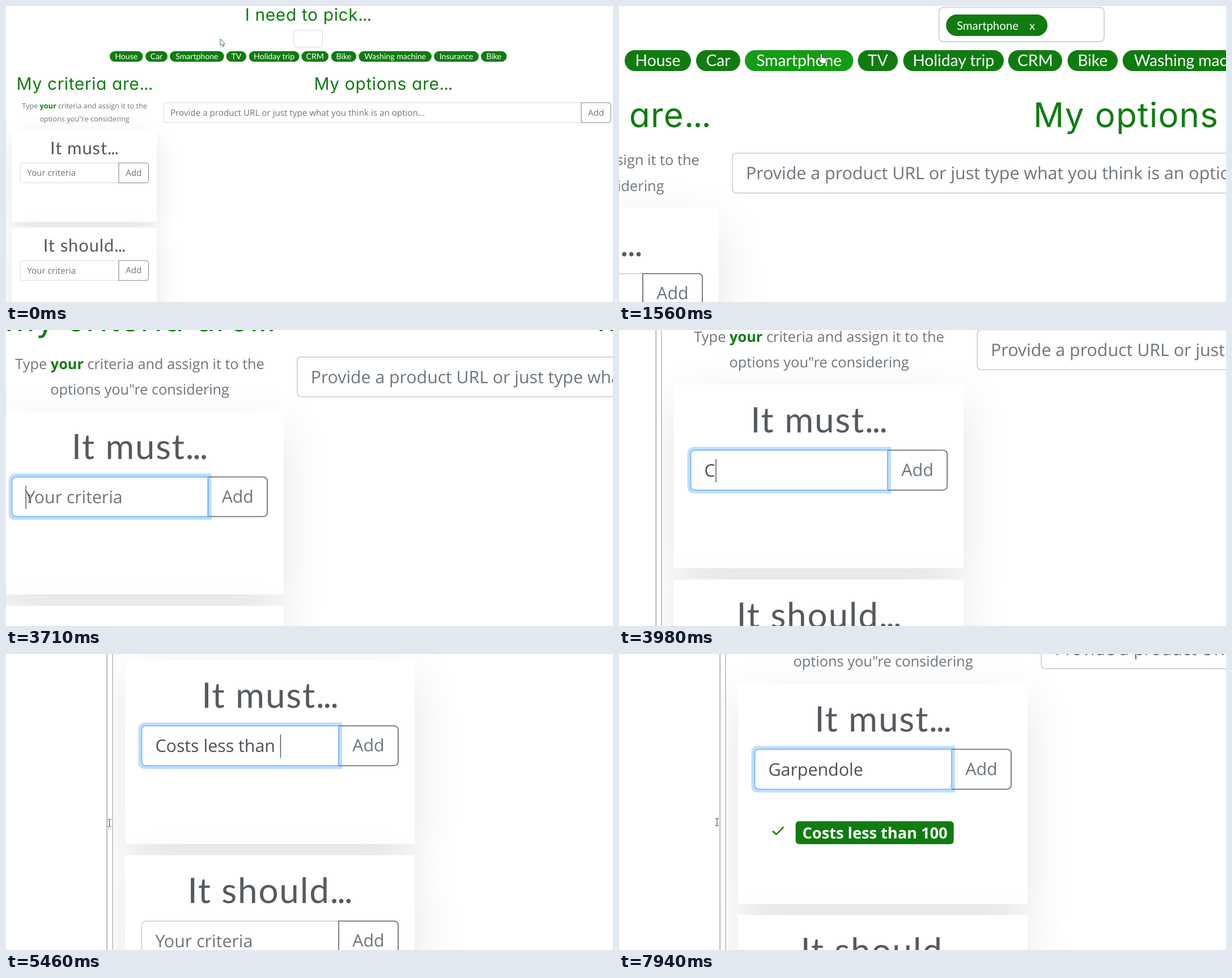
These frames come from a looping animation (1071x523 px, 7.99 s). An HTML page:

```html
<!DOCTYPE html>
<html lang="en">
<head>
<meta charset="utf-8">
<title>Decision helper</title>
<style>
  html, body { margin: 0; width: 100%; height: 100%; overflow: hidden; background: #fff; }
  svg { display: block; width: 1071px; height: 523px; }
  text { font-family: "Open Sans", sans-serif; font-size: 15.2px; fill: #6c757d; white-space: pre; text-rendering: geometricPrecision; }
  .mid { text-anchor: middle; }
  .head { font-family: Inter, sans-serif; font-size: 30px; letter-spacing: .6px; font-feature-settings: "cv11"; fill: #107c10; }
  .title { font-family: Lato, sans-serif; font-size: 31px; letter-spacing: .9px; fill: #555a5f; }
  .dots { letter-spacing: -1px; }
  .pill { font-family: Lato, sans-serif; font-size: 14.1px; fill: #fff; }
  .tag { font-family: Lato, sans-serif; font-size: 10.2px; fill: #fff; }
  .hint { font-size: 12.7px; }
  .hint tspan { font-weight: 700; fill: #107c10; }
  .badge { font-size: 13.6px; font-weight: 700; fill: #fff; }
  .typed { fill: #495057; }
  .shadow { fill: #000; opacity: .1; filter: blur(22px); }
</style>
</head>
<body>
<svg id="stage" viewBox="0 0 1071 523"></svg>
<script>
const LOOP = 7990;
const GREEN = '#107c10';
const T = { hover: 620, tag: 1560, leave: 1930, focus: 3030, tab: 5950, enter: 6150, refocus: 6700 };
const ENTRIES = [
  { text: 'Costs less than 100', start: 3900, step: 100, clear: T.enter },
  { text: 'Garpendole', start: 6800, step: 65, clear: LOOP }
];

// time, scale, x, y
const CAMERA = [
  [0, 1, 0, 0], [740, 1, 0, 0], [1090, 2, -356, -83.5], [1820, 2, -356, -83.5], [2210, 1, 0, 0],
  [3390, 1, 0, 0], [3760, 2, -40, -297], [4200, 2, 189, -389.6], [4340, 2, 189, -390],
  [5080, 2, 189, -390], [5620, 2, 189, -434], [7480, 2, 189, -434], [7945, 2, 189, -388]
];
// time, x, y on the stage
const POINTER = [
  [0, 378, 58], [50, 378, 58], [720, 357, 84], [1850, 357, 84], [2580, 85, 302], [2720, 85, 302],
  [3000, 41, 298], [5050, 41, 298], [5051, 190, 292], [5600, 182, 299], [6640, 182, 299],
  [7400, 176, 298], [7940, 173, 297]
];
// start time, shape
const SHAPES = [[0, 'arrow'], [T.hover, 'hand'], [T.leave, 'arrow'], [2480, 'beam'], [3900, ''], [5060, 'beam']];

const PILLS = [
  ['House', 183, 241.5], ['Car', 246, 285], ['Smartphone', 289, 384.7], ['TV', 388.7, 424],
  ['Holiday trip', 428.7, 517.5], ['CRM', 521.3, 569], ['Bike', 573.7, 618],
  ['Washing machine', 622.3, 751], ['Insurance', 755, 834], ['Bike', 838, 883.5]
];

const stage = document.getElementById('stage');

function add(parent, tag, attrs = {}, content = '') {
  const el = document.createElementNS('http://www.w3.org/2000/svg', tag);
  for (const key in attrs) el.setAttribute(key, attrs[key]);
  el.innerHTML = content;
  parent.append(el);
  return el;
}
const group = (parent, attrs) => add(parent, 'g', attrs);
const label = (parent, cls, x, y, content) => add(parent, 'text', { class: cls, x, y }, content);
const heading = (parent, cls, x, y, words) => label(parent, cls + ' mid', x, y, words + '<tspan class="dots">...</tspan>');
const rect = (parent, x, y, width, height, attrs) => add(parent, 'rect', { x, y, width, height, ...attrs });

// Outline with separate corner radii on the left and right side
function outline(parent, x, y, w, h, left, right, attrs) {
  const d = `M${x + left} ${y}h${w - left - right}q${right} 0 ${right} ${right}v${h - 2 * right}` +
    `q0 ${right} ${-right} ${right}h${left + right - w}q${-left} 0 ${-left} ${-left}` +
    `v${2 * left - h}q0 ${-left} ${left} ${-left}z`;
  return add(parent, 'path', { d, fill: 'none', ...attrs });
}

function inputRow(parent, x, y, split, right, hint) {
  const height = 35.2;
  outline(parent, x, y, split - x, height, 4, 0, { fill: '#fff', stroke: '#ced4da', 'stroke-width': .9 });
  outline(parent, split, y, right - split, height, 0, 4, { fill: '#fff', stroke: '#6c757d', 'stroke-width': .9 });
  label(parent, 'mid', (split + right) / 2, y + 22.7, 'Add');
  return label(parent, '', x + 12, y + 23.1, hint);
}

function card(parent, title, height) {
  const g = group(parent);
  const shade = rect(g, 10.5, 15, 255.5, height, { class: 'shadow' });
  const face = rect(g, 10.5, 0, 255.5, height, { fill: '#fff' });
  heading(g, 'title', 138, 42.5, title);
  const hint = inputRow(g, 25.2, 58.2, 199, 251.5, 'Your criteria');
  return { g, hint, resize: h => [shade, face].forEach(el => el.setAttribute('height', h)) };
}

// Page
const page = group(stage);
const clip = add(add(page, 'defs'), 'clipPath', { id: 'window' });
rect(clip, -.5, -50, 1200, 800);
rect(page, -6, -50, 1.2, 800, { fill: '#c2c2c2' });
rect(page, -.8, -50, .6, 800, { fill: '#a9a9a9' });
const content = group(page, { 'clip-path': 'url(#window)' });

heading(content, 'head', 533, 26, 'I need to pick');
const pickBox = rect(content, 508, 43, 50.5, 29.4, { rx: 4, fill: '#fff', stroke: '#ced4da' });
const pickTag = group(content);
rect(pickTag, 466.5, 49.3, 89.5, 19, { rx: 9.5, fill: GREEN });
label(pickTag, 'tag', 476, 62.8, 'Smartphone');
label(pickTag, 'tag', 540, 62.8, 'x');

const lower = group(content);
const pillShapes = PILLS.map(([name, left, right]) => {
  const shape = rect(lower, left, 80.7, right - left, 18.6, { rx: 9.3, fill: GREEN });
  label(lower, 'pill mid', (left + right) / 2, 94.8, name);
  return shape;
});
heading(lower, 'head', 138.5, 148.6, 'My criteria are');
heading(lower, 'head', 665.5, 148.6, 'My options are');

const must = card(lower, 'It must', 162.5);
must.g.setAttribute('transform', 'translate(0 220)');
const should = card(lower, 'It should', 162.5);
label(lower, 'hint mid', 138.5, 182.3, 'Type <tspan>your</tspan> criteria and assign it to the');
label(lower, 'hint mid', 138.5, 205, 'options you"re considering');
inputRow(lower, 278, 171.8, 1015, 1067, 'Provide a product URL or just type what you think is an option...');

// Live parts of the first card
const inputRing = group(must.g);
outline(inputRing, 23.7, 56.7, 176.8, 38.2, 5, 0, { stroke: '#007bff', 'stroke-opacity': .25, 'stroke-width': 3 });
outline(inputRing, 25.2, 58.2, 173.8, 35.2, 4, 0, { stroke: '#80bdff', 'stroke-width': .9 });
const addRing = outline(must.g, 197.4, 56.6, 55.7, 38.4, 0, 5, { stroke: '#6c757d', 'stroke-opacity': .52, 'stroke-width': 3.4 });
const typed = label(must.g, 'typed', 37.2, 81.3, '');
const caret = rect(must.g, 37, 66, .7, 20.5, { fill: '#495057' });
const result = group(must.g);
rect(result, 61.3, 121.7, 139.5, 20.3, { rx: 3, fill: GREEN });
label(result, 'badge mid', 131.3, 136.8, 'Costs less than 100');
add(result, 'path', { d: 'M41 130.4l3.2 3 6.6-6.6', fill: 'none', stroke: GREEN, 'stroke-width': 1.3 });

// Pointer keeps its size while the page zooms
const pointer = group(stage);
const pointerShapes = {
  arrow: add(pointer, 'path', { d: 'M0 0V12L3 9.5L5 14L7 13L5 9H8.6Z', fill: '#fff', stroke: '#1f5a50', 'stroke-width': .9 }),
  hand: add(pointer, 'path', {
    d: 'M-1.5 1.2Q0-1 1.5 1.2V7L7.5 8.3Q9 9 8.8 11L7.5 17.5H0L-4.5 11.5Q-4.5 9.5-1.5 11Z',
    fill: '#fff', stroke: '#333', 'stroke-width': .8
  }),
  beam: add(pointer, 'path', {
    d: 'M-3-6.3H-1L0-5.5L1-6.3H3M0-5.5V5.5M-3 6.3H-1L0 5.5L1 6.3H3',
    fill: 'none', stroke: '#333', 'stroke-width': 1
  })
};

const clamp = v => Math.min(1, Math.max(0, v));
const ease = q => q < .5 ? 4 * q ** 3 : 1 - 4 * (1 - q) ** 3;
const show = (el, on) => el.setAttribute('visibility', on ? 'visible' : 'hidden');
const fade = (t, on, off) => clamp((t - on) / 120) * (1 - clamp((t - off) / 120));

function sample(track, t) {
  const next = track.findIndex(key => key[0] > t);
  if (next < 0) return track.at(-1).slice(1);
  const a = track[next - 1], b = track[next];
  const q = ease((t - a[0]) / (b[0] - a[0]));
  return a.slice(1).map((v, i) => v + (b[i + 1] - v) * q);
}

function render(t) {
  const [scale, x, y] = sample(CAMERA, t);
  page.setAttribute('transform', `translate(${x} ${y}) scale(${scale})`);

  const picked = t >= T.tag;
  pickBox.setAttribute('x', picked ? 460.3 : 508);
  pickBox.setAttribute('width', picked ? 145.7 : 50.5);
  pickBox.setAttribute('height', picked ? 30.3 : 29.4);
  show(pickTag, picked);
  lower.setAttribute('transform', `translate(0 ${picked ? 0 : -.9})`);
  pillShapes[2].setAttribute('fill', t >= T.hover && t < T.leave ? '#149c14' : GREEN);

  const entry = ENTRIES.find(e => t < e.clear);
  const count = Math.max(0, Math.min(entry.text.length, Math.floor((t - entry.start) / entry.step) + 1));
  typed.textContent = entry.text.slice(0, count);
  show(must.hint, !count);

  const focused = (t >= T.focus && t < T.tab) || t >= T.refocus;
  const idle = t - entry.start - entry.step * (entry.text.length - 1);
  show(caret, focused && idle < 450);
  caret.setAttribute('x', 37.2 + (count ? typed.getComputedTextLength() + .4 : 0));
  inputRing.setAttribute('opacity', fade(t, T.focus, T.tab) + fade(t, T.refocus, LOOP));
  addRing.setAttribute('opacity', fade(t, T.tab, T.refocus));

  const added = t >= T.enter;
  show(result, added);
  must.resize(added ? 195 : 162.5);
  should.g.setAttribute('transform', `translate(0 ${added ? 424.6 : 392.5})`);

  const [px, py] = sample(POINTER, t);
  pointer.setAttribute('transform', `translate(${px} ${py})`);
  const shape = SHAPES.findLast(s => s[0] <= t)[1];
  for (const name in pointerShapes) show(pointerShapes[name], name === shape);
}

const origin = performance.now();
function tick() {
  render((performance.now() - origin) % LOOP);
  requestAnimationFrame(tick);
}
tick();
</script>
</body>
</html>
```
